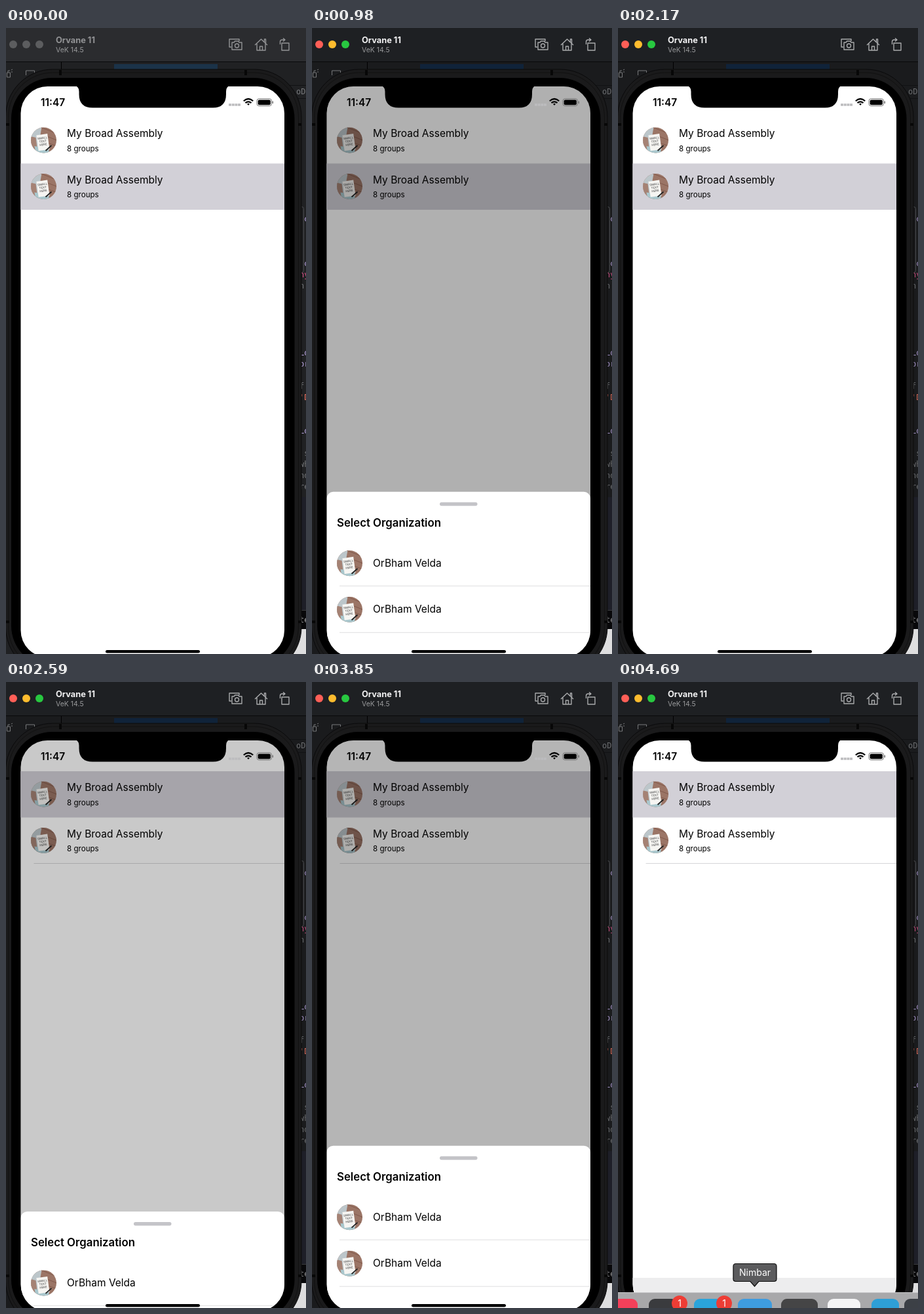
An HTML page for the animation above (4970 ms loop, 458x954 px).

```html
<!DOCTYPE html>
<html lang="en">
<head>
<meta charset="utf-8">
<title>Bottom sheet</title>
<style>
html, body { margin: 0; width: 100%; height: 100%; overflow: hidden; background: #1b1c1e; }
svg { display: block; width: 458px; height: 954px; font-family: Inter, "Open Sans", sans-serif; }
.name { font-size: 15.5px; }
.sub { font-size: 11.6px; }
.code { font: 12px "DejaVu Sans Mono", monospace; }
</style>
</head>
<body>
<svg viewBox="0 0 458 954">
  <defs>
    <clipPath id="screen"><rect x="22.5" y="89" width="402.5" height="870" rx="41"/></clipPath>
    <clipPath id="round"><circle r="19.5"/></clipPath>
    <g id="avatar" clip-path="url(#round)">
      <rect x="-20" y="-20" width="40" height="40" fill="#9b7566"/>
      <path d="M-20-20H-3L-10 20H-20Z" fill="#bcc6ca"/>
      <path d="M-20-6L-12-4L-9 20H-20Z" fill="#a58274"/>
      <path d="M-5-20L20-10M-3-9L20 0M6 4L20 9" stroke="#80594b" fill="none"/>
      <path d="M-14 9L8 13V20H-12Z" fill="#a9c7cd"/>
      <g transform="rotate(-8)">
        <rect x="-10" y="-9" width="17" height="24" fill="#f6f5f2"/>
        <g font-size="4.4" font-weight="600" fill="#666" text-anchor="middle">
          <text x="-1.5" y="-2">SMALL</text><text x="-1.5" y="3">TEXT</text><text x="-1.5" y="8">HERE</text>
        </g>
      </g>
      <path d="M3 16L12 8" stroke="#222" stroke-width="1.8"/>
    </g>
  </defs>

  <!-- editor window behind the phone -->
  <rect id="back" width="458" height="954"/>
  <rect id="tab" x="165" y="55" width="158" height="12"/>
  <path d="M84.5 51V64" stroke="#000"/>
  <g fill="none" stroke="#77787a">
    <path d="M1.500 68h5v7h-5zM3 68v-3h3M8 64l2-1M8 67h2"/>
    <path d="M30.500 72v-7h13v4"/>
  </g>
  <path d="M420 87.500H458M420 107.500H458" stroke="#111214"/>
  <rect x="440" y="715" width="18" height="172" fill="#1e1f28"/>
  <rect x="440" y="887" width="18" height="29" fill="#08080a"/>
  <path d="M440 887.500H458" stroke="#3b3c3e"/>
  <rect x="425" y="916" width="33" height="38" fill="#dededf"/>
  <rect x="440.500" y="272.500" width="14" height="100" rx="3" fill="none" stroke="#4b4c4f"/>
  <g id="code" class="code"></g>

  <!-- simulator title bar -->
  <rect id="bar" width="458" height="51"/>
  <path d="M0 51.500H458" stroke="#08090a"/>
  <g id="dots"></g>
  <text id="device" x="76" y="23" font-size="12.8" font-weight="700">Orvane 11</text>
  <text x="76" y="37" font-size="10.5" fill="#98999b">VeK 14.5</text>
  <g id="tools" fill="none" stroke-width="1.4" stroke-linejoin="round">
    <path d="M344 29h-3v-12h15v3"/>
    <path d="M345 22h3l1.500-2h5l1.500 2h4v11h-15z"/><circle cx="352.500" cy="27" r="3"/>
    <path d="M380 26l9.500-9 9.500 9M383 24v10h13v-10M387.500 34v-6h4v6M394.500 21v-4h2v6"/>
    <path d="M421 23h11v11h-11zM418.500 25v-4q0-3 3-3h4M423 15.500l3 2.500-3 2.500"/>
  </g>

  <!-- phone body -->
  <rect x="-.5" y="63" width="451.500" height="922" rx="72" fill="#1a1a1b" stroke="#0a0a0b"/>
  <rect x="3.500" y="68" width="443" height="912" rx="68" fill="none" stroke="#111"/>
  <rect x="8" y="76" width="432.500" height="897" rx="62" fill="#000"/>
  <path d="M83 64v8M366 64v8M0 147h5M446 147h5M0 905h5M446 905h5" stroke="#070707" stroke-width="4"/>

  <g clip-path="url(#screen)">
    <rect x="22" y="88" width="404" height="872" fill="#fff"/>
    <rect id="pick" x="22" width="404" height="70.500" fill="#d2d0d7"/>
    <path id="rule" d="M42.500 276.500H426" stroke="#d6d6d8"/>
    <g id="list"></g>
    <rect id="dim" x="22" y="88" width="404" height="872"/>
    <g id="sheet">
      <rect x="22.500" width="402.500" height="300" rx="10" fill="#fff"/>
      <rect x="195" y="16" width="57.500" height="5.500" rx="2.700" fill="#c4c4c8"/>
      <text x="38" y="53" font-size="16.8" font-weight="600">Select Organization</text>
      <path d="M42 143.500H426M42 214.500H426" stroke="#dededf"/>
    </g>
    <rect id="shade" x="22" y="908" width="404" height="52" fill="#ededee"/>
    <rect x="152" y="948" width="144" height="4.600" rx="2.300"/>
    <path d="M106 88Q111.500 90 111.500 97V101Q111.500 121.500 132 121.500H316Q336 121.500 336 101V97Q336 90 341 88Z"/>
  </g>
  <text x="53" y="119" font-size="15.5" font-weight="600">11:47</text>
  <path d="M340 117h4M344.700 117h4M349.400 117h4M354 117h4" stroke="#bcbcbe" stroke-width="3.600"/>
  <g fill="none" stroke="#000" stroke-width="2.200">
    <path d="M362.800 111.200Q370 104.800 377.200 111.200M365.500 114.200Q370 110.400 374.500 114.200"/>
    <path d="M368 115.800Q370 114.300 372 115.800L370 118Z" fill="#000" stroke="none"/>
    <rect x="383" y="107.800" width="22.500" height="11" rx="3.300" stroke="#777" stroke-width="1"/>
    <rect x="384.600" y="109.400" width="19.300" height="7.800" rx="2" fill="#000" stroke="none"/>
    <path d="M407.300 111.500v3.600" stroke="#777" stroke-width="1.500"/>
  </g>

  <g id="dock"></g>
  <g id="tip">
    <path d="M180 886.500H238Q242 886.500 242 890.500V909.500Q242 913.500 238 913.500H215L208.500 921L202 913.500H180Q176 913.500 176 909.500V890.500Q176 886.500 180 886.500Z" fill="#5b5b5d" stroke="#0b0b0b" stroke-width="1.200"/>
    <text x="209" y="905" font-size="14" fill="#fff" text-anchor="middle">Nimbar</text>
  </g>
</svg>
<script>
const $ = id => document.getElementById(id);
const add = (id, html) => $(id).insertAdjacentHTML("beforeend", html);
const set = (id, attrs) => {
  for (const k in attrs) $(id).setAttribute(k, attrs[k]);
};
const show = (id, on) => set(id, { visibility: on ? "visible" : "hidden" });

const avatar = y => `<use href="#avatar" transform="translate(57.500 ${y})"/>`;
for (const y of [171, 241.5]) {
  add("list", `${avatar(y)}<text class="name" x="93" y="${y - 5}">My Broad Assembly</text>
    <text class="sub" x="93" y="${y + 16.5}">8 groups</text>`);
}
for (const y of [109, 179.5]) {
  add("sheet", `${avatar(y)}<text class="name" x="93" y="${y + 5}">OrBham Velda</text>`);
}
for (const i of [0, 1, 2]) add("dots", `<circle cx="${11 + 20 * i}" cy="25" r="6"/>`);

const lilac = "#b9a5e0", grey = "#77797c";
const lines = [
  [101, "oD", grey, 443], [295, "c", lilac, 455], [363, "c", lilac, 455],
  [380, "ny", "#e0558c"], [397, "n", grey], [499, "Lo", lilac],
  [516, "or", lilac], [533, " :", grey], [550, "f:", grey],
  [567, "'D", "#e8705f"], [618, "Lo", lilac], [652, " s", grey],
  [669, "wh", grey], [686, "nd", grey], [703, "re", grey], [906, "te", "#a5a5a7"]
];
for (const [y, text, fill, x = 448] of lines) {
  add("code", `<text x="${x}" y="${y}" fill="${fill}" xml:space="preserve">${text}</text>`);
}

// dock icons: x, width, colour
add("dock", `<rect y="930" width="458" height="60" fill="#a8a8aa"/><path d="M0 930.500H458" stroke="#c9c9cb"/>`);
const icons = [
  [-14, 44, "#f4405a"], [47, 44, "#3a3b3e"], [116, 44, "#2aa4dc"], [183, 52, "#3e9ce0"],
  [249, 56, "#454546"], [320, 50, "#f4f4f5"], [387, 42, "#2e9fd6"], [437, 40, "#3c4046"]
];
for (const [x, w, fill] of icons) {
  add("dock", `<rect x="${x}" y="940" width="${w}" height="50" rx="9" fill="${fill}"/>`);
}
for (const x of [94, 162]) {
  add("dock", `<circle cx="${x}" cy="947" r="12" fill="#ee3d35"/>
    <text x="${x}" y="952" font-size="14" fill="#fff" text-anchor="middle">1</text>`);
}

const LOOP = 4970, STEP = 70;
const OPEN_Y = 689, HIDDEN_Y = 959;
const visits = [[735, 1706], [2485, 3827]];

// critically damped spring from 0 to 1
const spring = (ms, rate) => {
  const x = Math.max(0, ms) / 1000 * rate;
  return 1 - (1 + x) * Math.exp(-x);
};
const presence = (t, rate) => visits.reduce(
  (sum, [open, close]) => sum + spring(t - open, rate) - spring(t - close, rate), 0);

function draw(t) {
  const active = t >= 490;
  set("back", { fill: active ? "#1a1b1d" : "#202123" });
  set("tab", { fill: active ? "#10233a" : "#1b3349" });
  set("code", { opacity: active ? .85 : 1 });
  set("bar", { fill: active ? "#1e2023" : "#2b2c2f" });
  set("device", { fill: active ? "#f2f2f3" : "#929395" });
  set("tools", { stroke: active ? "#a9aaac" : "#929395" });
  const lights = active ? ["#ff5f57", "#febc2e", "#28c840"] : ["#5c5d5f", "#5c5d5f", "#5c5d5f"];
  [...$("dots").children].forEach((dot, i) => dot.setAttribute("fill", lights[i]));

  const first = t >= 2520;
  set("pick", { y: first ? 136 : 206.5 });
  show("rule", first);

  const top = HIDDEN_Y - (HIDDEN_Y - OPEN_Y) * presence(t, 18);
  set("sheet", { transform: `translate(0 ${top.toFixed(2)})` });
  set("dim", { opacity: (.318 * presence(t, 22)).toFixed(4) });

  const rise = Math.min(1, Math.max(0, (t - 4410) / 280));
  set("dock", { transform: `translate(0 ${24 * (1 - rise)})` });
  show("dock", rise > 0);
  show("shade", rise === 1);
  show("tip", t >= 4620);
}

function tick() {
  const t = performance.now() % LOOP;
  draw(Math.floor(t / STEP) * STEP);
  requestAnimationFrame(tick);
}
tick();
</script>
</body>
</html>
```
